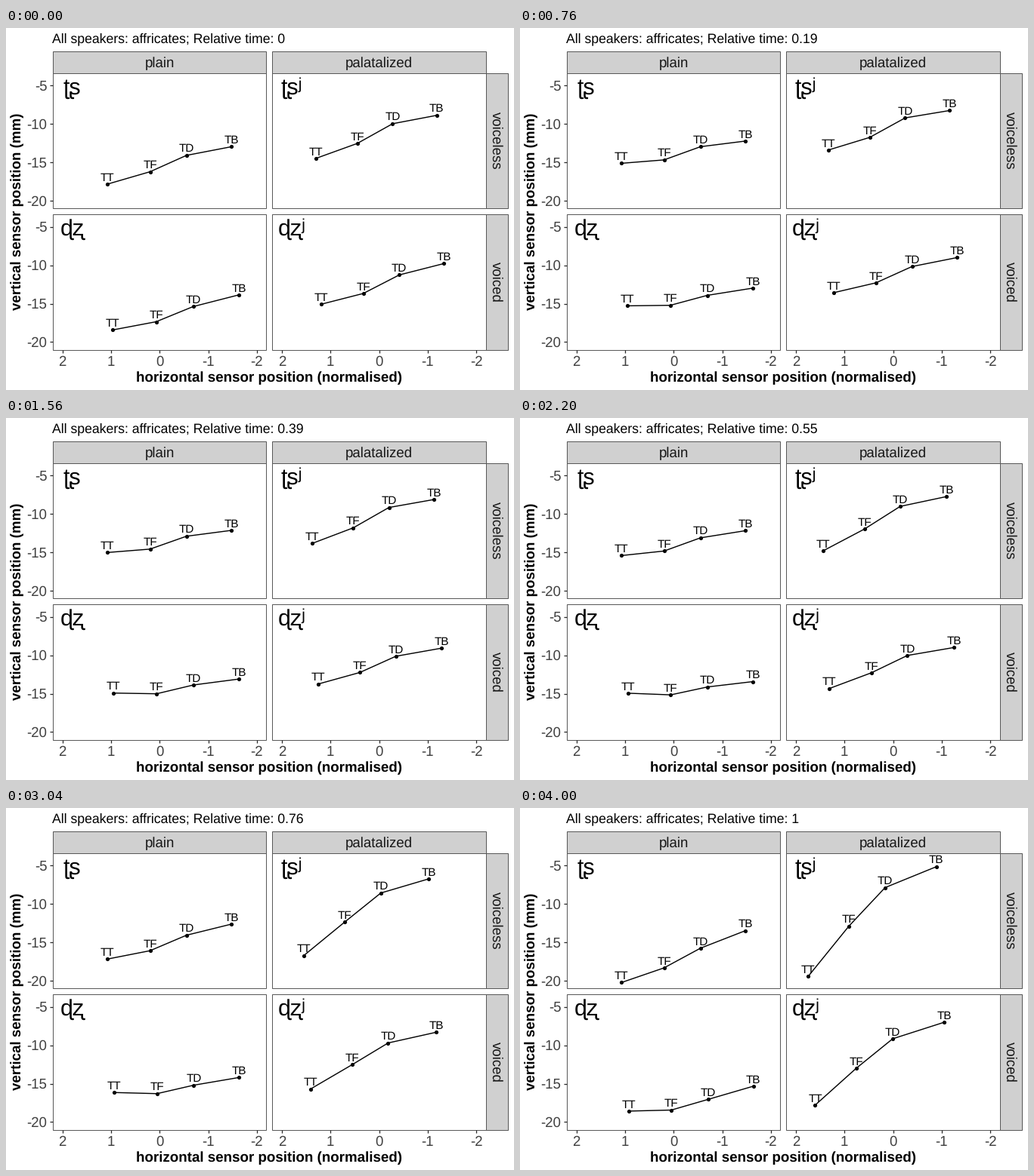
These frames come from a looping animation (672x480 px, 4040 ms). A matplotlib script:

```python
import numpy as np
import matplotlib.pyplot as plt
from matplotlib.animation import FuncAnimation
from matplotlib.patches import Rectangle

W, H, DPI = 672, 480, 96
FRAMES, INTERVAL = 101, 40
PT = 72 / DPI  # points per pixel

plt.rcParams["font.family"] = ["Liberation Sans", "DejaVu Sans"]
plt.rcParams["text.hinting"] = "none"

STRIP, EDGE, TICK = "#d0d0d0", "#585858", "#2b2b2b"
STRIP_TEXT, TICK_TEXT = "#171717", "#404040"

SENSORS = ["TT", "TF", "TD", "TB"]
COLS, ROWS = (62.2, 352.6), (60.5, 248)
PANEL_W, PANEL_H = 282.6, 179.2

# Tongue poses (sensor heights in pixels) at a few key times. A panel is the
# plain voiceless pose plus the effects of palatalization and voicing.
KEY_TIMES = [0, .19, .55, 1]
PLAIN = [[207.6, 191.2, 169.5, 158], [180, 175.5, 158, 150.5],
         [183, 177, 159.5, 150], [232, 212.6, 186.5, 163.2]]
PALATAL = [[-34, -37.5, -42, -41.6], [-17.5, -29.8, -38.2, -40.5],
           [-6.3, -29.2, -41.7, -45.2], [-8, -55.4, -80.4, -84.8]]
VOICED = [[5.8, 11.4, 13, 9], [1.5, 5.3, 9.6, 7.5],
          [-5, 3.2, 10.2, 12.6], [-17, 1, 13, 18.8]]


def spline(t, v, at):
    """Natural cubic spline through (t, v)."""
    h, slope = np.diff(t), np.diff(v) / np.diff(t)
    n = len(t)
    a, rhs = np.eye(n), np.zeros(n)
    for i in range(1, n - 1):
        a[i, i - 1:i + 2] = h[i - 1], 2 * (h[i - 1] + h[i]), h[i]
        rhs[i] = 6 * (slope[i] - slope[i - 1])
    m = np.linalg.solve(a, rhs)
    k = np.clip(np.searchsorted(t, at, side="right") - 1, 0, n - 2)
    p, q = at - t[k], t[k + 1] - at
    return ((m[k] * q**3 + m[k + 1] * p**3) / (6 * h[k])
            + (v[k] / h[k] - m[k] * h[k] / 6) * q
            + (v[k + 1] / h[k] - m[k + 1] * h[k] / 6) * p)


def track(keys):
    """Sample a path; most of the first move is done by t = 0.14."""
    early = keys[1] + .05 * (keys[0] - keys[1])
    return spline(np.insert(KEY_TIMES, 1, .14), np.insert(keys, 1, early),
                  np.linspace(0, 1, FRAMES))


def heights(col, row):
    poses = np.array(PLAIN) + col * np.array(PALATAL) + row * np.array(VOICED)
    return np.array([track(keys) for keys in poses.T]) + row * 187.5


def positions(col, row):
    """Palatalized tongues slide forward; the others barely drift."""
    t = np.linspace(0, 1, FRAMES)
    i = np.arange(4)[:, None]
    rest = np.array([[134.7], [191], [239.2], [298.8]])
    slide = np.array([[28.5], [29.5], [28.5], [19]])
    return (rest + col * (275.4 - 1.3 * i - slide * (.35 * t + .65 * t**3))
            + row * (7.2 + .8 * i + (2.2 - .5 * i) * t))


fig = plt.figure(figsize=(W / DPI, H / DPI), dpi=DPI, facecolor="white")
ax = fig.add_axes([0, 0, 1, 1])
ax.set(xlim=(.5, W + .5), ylim=(H + .6, .6))
ax.axis("off")


def text(x, y, s, px, ha="center", color="black", **kw):
    return ax.text(x, y, s, fontsize=px * PT, ha=ha, va="baseline",
                   color=color, rotation_mode="anchor", **kw)


def box(x, y, w, h, fill):
    ax.add_patch(Rectangle((x, y), w, h, fc=fill, ec=EDGE, lw=PT))


def tick(x, y):
    ax.plot(x, y, color=TICK, lw=1.3 * PT, solid_capstyle="butt")


for x, name in zip(COLS, ("plain", "palatalized")):
    box(x, 31.3, PANEL_W, 29.2, STRIP)
    text(x + PANEL_W / 2, 52.8, name, 18.67, color=STRIP_TEXT)
    for i in range(5):
        tx = x + 12.8 + 64.35 * i
        tick([tx, tx], [427.5, 431.3])
        text(tx, 448.4, str(2 - i), 18.67, color=TICK_TEXT)

for y, name in zip(ROWS, ("voiceless", "voiced")):
    box(635.5, y, 29, PANEL_H, STRIP)
    text(643.5, y + PANEL_H / 2, name, 18.67, color=STRIP_TEXT, rotation=270)
    for i in range(4):
        ty = y + 16.3 + 50.9 * i
        tick([58.2, 62], [ty, ty])
        text(55, ty + 6.5, str(-5 - 5 * i), 18.67, "right", TICK_TEXT)

panels = []
for p, symbol in enumerate(("ʈʂ", "ʈʂʲ", "ɖʐ", "ɖʐʲ")):
    row, col = divmod(p, 2)
    x, y = COLS[col], ROWS[row]
    box(x, y, PANEL_W, PANEL_H, "white")
    text(x + 25.8, y + 27.6, symbol, 30.35)
    line, = ax.plot([], [], "o-", color="black", lw=1.42 * PT,
                    ms=5.2 * PT, mew=0)
    labels = [text(0, 0, s, 15.2) for s in SENSORS]
    panels.append((line, labels, positions(col, row), heights(col, row)))

text(348.7, 469.3, "horizontal sensor position (normalised)", 18.75,
     weight="bold")
text(20.7, 244, "vertical sensor position (mm)", 18.75, weight="bold",
     rotation=90)
title = text(61.3, 19.6, "", 17.6, "left")


def update(f):
    title.set_text(f"All speakers: affricates; Relative time: {f / 100:g}")
    artists = [title]
    for line, labels, xs, ys in panels:
        line.set_data(xs[:, f], ys[:, f])
        for label, x, y in zip(labels, xs[:, f], ys[:, f]):
            label.set_position((x, y - 4.4))
        artists += [line, *labels]
    return artists


anim = FuncAnimation(fig, update, frames=FRAMES, interval=INTERVAL,
                     repeat=True, repeat_delay=0, blit=False)
plt.show()
```
